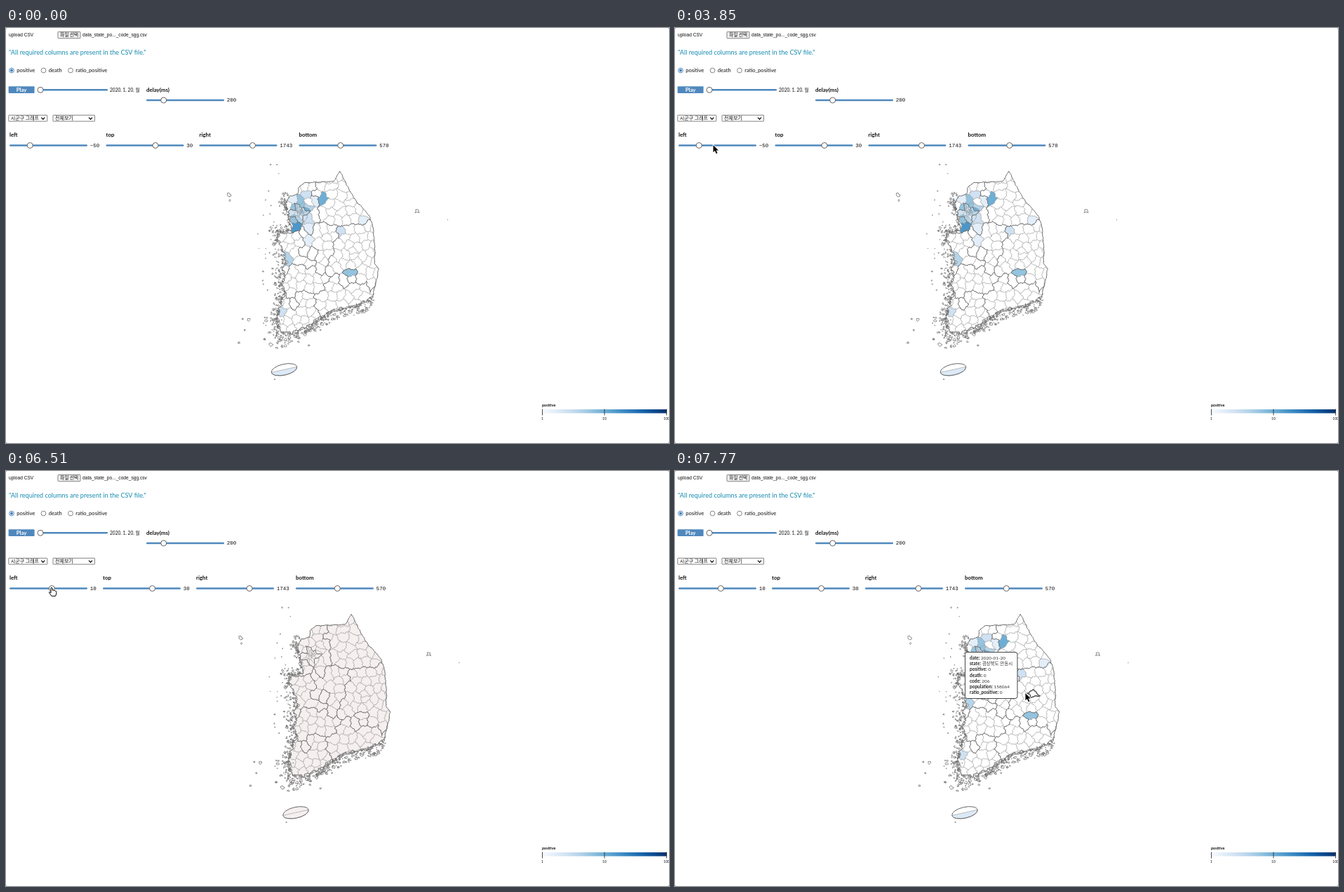
An HTML page with a canvas for the animation above (8 s loop, 945x592 px).

```html
<!DOCTYPE html>
<html lang="ko">
<head>
<meta charset="utf-8">
<title>Map dashboard</title>
<style>
html, body { margin: 0; width: 100%; height: 100%; overflow: hidden; background: #fff; }
canvas { display: block; }
</style>
</head>
<body>
<canvas id="stage" width="945" height="592"></canvas>
<script>
const ctx = document.getElementById('stage').getContext('2d');
const LOOP = 8000, STEP = 70, TAU = Math.PI * 2;
const BLUE = '#4f88bd';
const RAMP = ['#f7fbff', '#e3eef9', '#cfe1f2', '#b5d4e9', '#93c3df', '#6daed5', '#4b97c9', '#2f7ebc', '#1864aa', '#0a4a90', '#08306b'];
const CJK = '"Noto Sans CJK KR", "Noto Sans CJK JP", "Noto Sans CJK", sans-serif';
const UI = 'Lato, ' + CJK, SYS = '"Liberation Sans", ' + CJK, MONO = '"Liberation Mono", monospace';

let seed = 41;
const rand = () => (seed = (seed * 16807) % 2147483647) / 2147483647;
const spread = r => (rand() + rand() - 1) * r;
const mix = (a, b, k) => a + (b - a) * k;
const clamp = v => Math.max(0, Math.min(1, v));
const gap = (a, b) => Math.hypot(a[0] - b[0], a[1] - b[1]);

// ---------- map geometry ----------
function wobble([x, y], amp) {
  return [
    x + amp * (Math.sin(y * 0.55 + x * 0.3) + 0.6 * Math.sin(y * 1.5 - x * 0.9)),
    y + amp * (Math.sin(x * 0.5 - y * 0.35) + 0.6 * Math.sin(x * 1.6 + y * 0.8))
  ];
}

// Adds a wavy line from a to b; neighbours that share an edge get the same line.
function wavyLine(path, a, b, ampAt, join) {
  const n = Math.ceil(gap(a, b) / 1.3) || 1;
  for (let i = 0; i <= n; i++) {
    const p = [mix(a[0], b[0], i / n), mix(a[1], b[1], i / n)];
    const w = wobble(p, ampAt(p));
    if (i || join) path.lineTo(...w); else path.moveTo(...w);
  }
}

function wavyShape(pts, ampAt) {
  const path = new Path2D();
  pts.forEach((p, i) => wavyLine(path, p, pts[(i + 1) % pts.length], ampAt, i > 0));
  path.closePath();
  return path;
}

// The coast is smooth in the east and breaks up towards the west and south.
const raggedness = ([x, y]) => Math.max(clamp((y - 376) / 18), y > 240 ? 0.65 * clamp((412 - x) / 10) : 0);

const shore = ('476,204 490,232 499,247 509,257 518,268 523,283 526,318 525,335 531,343 529,356 523,380 516,388 ' +
  '500,396 480,400 460,405 448,414 432,425 405,436 389,432 387,410 394,386 398,376 393,366 398,353 394,343 ' +
  '400,335 396,322 387,300 390,292 407,288 402,264 398,252 405,240 416,237 417,228 425,221 440,220 467,219')
  .split(' ').map(p => p.split(',').map(Number));
const coast = wavyShape(shore, p => 0.35 + 1.3 * raggedness(p));

// Regions: centre and, for cities, the radius they claim.
const regions = [
  [420, 262], [470, 247], [441, 315], [410, 325], [490, 330], [422, 362], [418, 402], [476, 394],
  [418, 263, 9], [488, 353, 8], [410, 391, 7], [434, 326, 7]
];

function regionOf(site) {
  const city = regions.findIndex(r => r[2] > gap(r, site));
  if (city >= 0) return city;
  const land = regions.filter(r => !r[2]);
  return land.reduce((best, r, i) => gap(r, site) < gap(land[best], site) ? i : best, 0);
}

// Districts with reported cases: x, y, share of the colour ramp.
const cases = [
  [451, 243, 0.52], [430, 239, 0.2], [439, 244, 0.14], [428, 255, 0.3], [410, 246, 0.1], [419, 247, 0.42],
  [430, 271, 0.23], [412, 284, 0.55], [431, 287, 0.13], [429, 302, 0.13], [510, 276, 0.14], [478, 291, 0.24],
  [400, 327, 0.28], [491, 350, 0.38], [393, 405, 0.24]
];
const hoverSite = [495, 318, 0];

function makeSites() {
  const sites = [...cases, hoverSite];
  for (let i = 0; i < 28; i++) sites.push([418 + spread(10), 263 + spread(10), 0.1 + rand() * 0.4]);
  for (let y = 202, row = 0; y < 445; y += 12, row++) {
    for (let x = 376 + row % 2 * 6; x < 540; x += 12) {
      const site = [x + spread(6), y + spread(6), 0];
      if (sites.every(s => gap(s, site) > 7.5)) sites.push(site);
    }
  }
  return sites;
}

// Keeps the part of a cell nearer to a than to b; every edge remembers its neighbour.
function nearerTo(cell, a, b) {
  const side = p => (p[0] - (a[0] + b[0]) / 2) * (b[0] - a[0]) + (p[1] - (a[1] + b[1]) / 2) * (b[1] - a[1]);
  const out = [];
  cell.forEach((c, i) => {
    const next = cell[(i + 1) % cell.length], sc = side(c.p), sn = side(next.p);
    if (sc <= 0) out.push(c);
    if (sc * sn < 0) {
      const k = sc / (sc - sn);
      out.push({ p: [mix(c.p[0], next.p[0], k), mix(c.p[1], next.p[1], k)], other: sc < 0 ? b : c.other });
    }
  });
  return out;
}

const thin = new Path2D(), bold = new Path2D(), shaded = [];
let hovered;
const districtAmp = p => gap(p, regions[8]) < 12 ? 0.3 : 0.9;

function buildDistricts() {
  const sites = makeSites(), reach = 24;
  for (const site of sites) {
    let cell = [[-1, -1], [1, -1], [1, 1], [-1, 1]]
      .map(([x, y]) => ({ p: [site[0] + x * reach, site[1] + y * reach] }));
    for (const other of sites) {
      if (other !== site && gap(other, site) < reach * 2.9) cell = nearerTo(cell, site, other);
    }
    const shape = wavyShape(cell.map(c => c.p), districtAmp);
    if (site === hoverSite) hovered = shape;
    if (site[2]) shaded.push([RAMP[Math.round(site[2] * 10)], shape]);
    cell.forEach((c, i) => {
      if (!c.other) return;
      const border = regionOf(site) !== regionOf(c.other);
      wavyLine(border ? bold : thin, c.p, cell[(i + 1) % cell.length].p, districtAmp);
    });
  }
}
buildDistricts();

const islands = new Path2D();
function addIsland(x, y, r) {
  for (let i = 0; i < 8; i++) {
    const d = r * (0.45 + rand() * 0.9), px = x + Math.cos(i / 8 * TAU) * d * 1.15, py = y + Math.sin(i / 8 * TAU) * d;
    if (i) islands.lineTo(px, py); else islands.moveTo(px, py);
  }
  islands.closePath();
}

// Scatters islands off the shore, denser where it is ragged.
for (let i = 0; i < 1300; i++) {
  const k = Math.floor(rand() * shore.length), f = rand(), a = shore[k], b = shore[(k + 1) % shore.length];
  const p = [mix(a[0], b[0], f), mix(a[1], b[1], f)], rough = raggedness(p);
  if (rand() > rough) continue;
  const west = clamp((415 - p[0]) / 20), out = Math.pow(rand(), 1.7) * (15 + 11 * west) * rough;
  const angle = Math.atan2(p[1] - 330, p[0] - 450) + spread(0.6);
  addIsland(p[0] + Math.cos(angle) * out, p[1] + Math.sin(angle) * out, 0.4 + rand() * rand() * 2.4 * rough);
}
for (let i = 0; i < 26; i++) addIsland(378 + spread(20), 300 + spread(150), 0.3 + rand() * 0.6);
[[318, 238, 2.6], [319, 246, 1.2], [346, 416, 2], [337, 415, 1.1], [340, 431, 1], [332, 449, 1.2], [386, 456, 1.6],
  [432, 453, 1.2], [383, 501, 0.7], [586, 261, 2.9], [629.5, 273.5, 0.3]].forEach(p => addIsland(...p));

const jeju = new Path2D(), jejuSouth = new Path2D();
jeju.ellipse(396.5, 487.3, 18.6, 7.8, -0.22, 0, TAU);
jejuSouth.ellipse(396.5, 487.3, 18.6, 7.8, -0.22, 0, Math.PI);
jejuSouth.closePath();

// ---------- drawing helpers ----------
function text(str, x, y, size, { color = '#111', font = UI, weight = 400, align = 'left' } = {}) {
  ctx.font = `${weight} ${size}px ${font}`;
  ctx.fillStyle = color;
  ctx.textAlign = align;
  ctx.fillText(str, x, y);
}

function fill(path, color) {
  ctx.fillStyle = color;
  ctx.fill(path);
}

function outline(path, color, width) {
  ctx.strokeStyle = color;
  ctx.lineWidth = width;
  ctx.stroke(path);
}

function box(x, y, w, h, radius, color, line) {
  const path = new Path2D();
  path.roundRect(x, y, w, h, radius);
  fill(path, color);
  if (line) outline(path, line, 0.9);
}

function disc(x, y, r, color, line) {
  const path = new Path2D();
  path.arc(x, y, r, 0, TAU);
  fill(path, color);
  if (line) outline(path, line, 0.9);
}

function slider(x, y, width, thumb) {
  box(x, y - 1.3, width, 2.6, 1.3, BLUE);
  disc(x + thumb, y, 4, '#fff', '#555');
}

function radio(x, label, on) {
  disc(x, 60.5, 3.4, '#fff', on ? '#3f7fb8' : '#767676');
  if (on) disc(x, 60.5, 2, '#3f7fb8');
  text(label, x + 7.2, 63, 7.6);
}

function select(x, width, label) {
  box(x, 124.3, width, 8.8, 0.5, '#fff', '#767676');
  text(label, x + 3, 131.4, 7, { font: CJK });
  const tip = x + width - 6;
  outline(new Path2D(`M${tip - 2.5} 127.6L${tip} 130.2L${tip + 2.5} 127.6`), '#111', 1.3);
}

// ---------- interface ----------
function drawControls(left) {
  text('upload CSV', 4, 12, 6.6, { font: SYS });
  box(74, 5.3, 32, 9.5, 1, '#efefef', '#767676');
  text('파일 선택', 90.2, 12.4, 6.6, { font: CJK, align: 'center' });
  text('data_state_po..._code_sgg.csv', 109, 12, 6.65, { font: SYS });
  text('"All required columns are present in the CSV file."', 4, 38, 9.15, { color: '#168cb0' });

  radio(8, 'positive', true);
  radio(53.5, 'death');
  radio(92, 'ratio_positive');

  box(3.6, 83.3, 37, 9.8, 1, BLUE);
  text('Play', 22, 91, 7.8, { color: '#fff', weight: 700, align: 'center' });
  slider(45.5, 88.3, 99.5, 3.5);
  text('2020. 1. 20. 월', 148, 91, 6.6);
  text('delay(ms)', 200, 91, 7.9, { weight: 700 });
  slider(200, 103, 111, 24.7);
  text('200', 314.7, 105.2, 7.5, { font: MONO });

  select(3.8, 55, '시군구 그래프');
  select(67, 59.5, '전체보기');

  let x = 5;
  [['left', left, 55.1 + left * 0.518], ['top', 30, 70.5], ['right', 1743, 76], ['bottom', 570, 59.3]]
    .forEach(([label, number, thumb]) => {
      const value = String(number).replace('-', '−');
      text(label, x, 155, 7.9, { weight: 700 });
      slider(x, 167.5, 111, thumb);
      text(value, x + 114.7, 169.7, 7.5, { font: MONO });
      x += 124 + value.length * 4.5;
    });
}

function drawLegend() {
  text('positive', 764, 540, 5.5, { weight: 700 });
  const ramp = ctx.createLinearGradient(764, 0, 942, 0);
  RAMP.forEach((c, i) => ramp.addColorStop(i / 10, c));
  ctx.fillStyle = ramp;
  ctx.fillRect(764, 544, 178, 5.5);
  ['1', '10', '100'].forEach((label, i) => {
    const x = 764 + i * 88.6;
    ctx.fillStyle = '#333';
    ctx.fillRect(x, 543.5, 0.9, 9);
    text(label, x + 0.4, 558.5, 5, { align: 'center' });
  });
}

function drawMap(moved, pending, hover) {
  const land = pending ? '#f5efef' : '#fff';
  ctx.save();
  ctx.translate(moved ? 16.5 : 0, 0);
  ctx.lineJoin = 'round';
  fill(coast, land);
  ctx.save();
  ctx.clip(coast);
  if (!pending) shaded.forEach(([color, shape]) => fill(shape, color));
  outline(thin, '#999', 0.4);
  outline(bold, '#666', 0.65);
  ctx.restore();
  outline(coast, '#666', 1);

  fill(islands, land);
  outline(islands, '#707070', 0.8);
  fill(jeju, land);
  if (!pending) fill(jejuSouth, '#dce9f6');
  outline(jejuSouth, '#999', 0.6);
  outline(jeju, '#666', 1);
  if (hover) outline(hovered, '#444', 1.2);
  ctx.restore();
}

function drawTooltip(x, y, state, code, population) {
  box(x + 0.5, y + 0.5, 74.5, 66, 3, '#fff', '#333');
  const rows = { date: '2020-01-20', state, positive: 0, death: 0, code, population, ratio_positive: 0 };
  Object.entries(rows).forEach(([key, value], i) => {
    const line = y + 11.2 + i * 8.1;
    text(key + ':', x + 7, line, 6.5, { weight: 700, color: '#222' });
    text(value, x + 7 + ctx.measureText(key + ': ').width, line, 6.5, { color: '#333' });
  });
}

// ---------- pointer ----------
// Stops of the pointer: time, x, y.
const route = [
  [770, 215, 580], [980, 139, 440], [1260, 139, 440], [1610, 3, 92], [2030, 16, 88], [2940, 15, 87],
  [3640, 50, 171], [3850, 54.5, 167], [4550, 60, 166], [5040, 65, 166], [6580, 65, 166],
  [7280, 389, 251], [7420, 502.5, 317], [7560, 499.5, 317]
];

function pointerAt(t) {
  const i = route.findIndex(p => p[0] > t);
  if (i < 0) return route[route.length - 1].slice(1);
  const a = route[i - 1], b = route[i], k = (t - a[0]) / (b[0] - a[0]), ease = k * k * (3 - 2 * k);
  return [mix(a[1], b[1], ease), mix(a[2], b[2], ease)];
}

const arrow = new Path2D('M0 0V10.2L2.4 8 4.2 12.2 6 11.4 4.2 7.4H7.4Z');
const hand = new Path2D('M-1 1Q0-1 1.2 1V4.2Q2.5 3.3 3.2 4.6 4.6 4 5.2 5.2 6.8 4.8 6.8 6.6V9L5.6 12.4H0L-3.2 8Q-4 6.4-2.4 6.6L-1 7.8Z');

function drawPointer(t) {
  if (t < route[0][0]) return;
  ctx.save();
  ctx.translate(...pointerAt(t));
  ctx.lineJoin = 'round';
  if (t >= 5180 && t < 6580) {
    fill(hand, '#fff');
    outline(hand, '#000', 1);
  } else {
    outline(arrow, '#fff', 1.8);
    fill(arrow, '#000');
  }
  ctx.restore();
}

// ---------- timeline ----------
function draw(time) {
  const t = Math.floor(time % LOOP / STEP) * STEP;
  const moved = t >= 5530, pending = moved && t < 6580;
  box(0, 0, 945, 592, 0, '#999');
  box(0, 0, 945, 592, 2, '#fff');
  drawControls(moved ? 10 : -50);
  drawLegend();
  drawMap(moved, pending, t >= 7420);
  if (t >= 7490) drawTooltip(t < 7560 ? 528 : 413, t < 7560 ? 270 : 258, '경상북도 안동시', 206, 158064);
  else if (t >= 7420) drawTooltip(493, 266, '충청남도 공주시', 151, 106915);
  drawPointer(t);
}

const start = performance.now();
function tick() {
  draw(performance.now() - start);
  requestAnimationFrame(tick);
}
tick();
</script>
</body>
</html>
```
